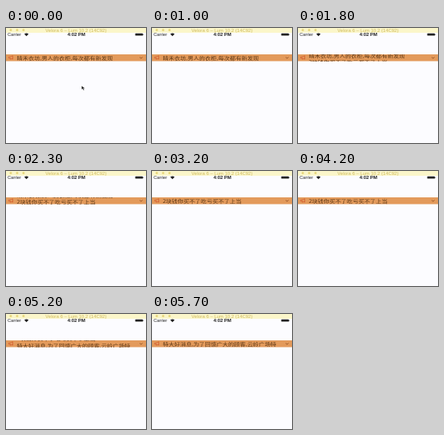
Animation of 176 by 144 pixels, one loop 5800 ms. Source, as an HTML page:

```html
<!DOCTYPE html>
<html lang="zh">
<head>
<meta charset="utf-8">
<title>Scrolling notice</title>
<style>
  html, body { margin: 0; width: 100%; height: 100%; overflow: hidden; background: #fcfcff; }
  svg { display: block; width: 176px; height: 144px; }
  text { font-family: "Liberation Sans", sans-serif; }
  #lines text { font: 7.3px "Noto Sans CJK SC", "Noto Sans CJK", sans-serif; fill: #5c3715; }
</style>
</head>
<body>
<svg viewBox="0 0 176 144">
  <defs><clipPath id="band"><rect y="33" width="176" height="9"/></clipPath></defs>
  <rect width="176" height="144" fill="#fcfcff"/>

  <!-- window title -->
  <rect width="176" height="6" fill="#fbf6ca"/>
  <g fill="#e6d67c">
    <circle cx="6" cy="2.5" r="1.5"/><circle cx="14" cy="2.5" r="1.5"/><circle cx="22" cy="2.5" r="1.5"/>
  </g>
  <text transform="translate(88 4.6) scale(1 .8)" font-size="6" text-anchor="middle" fill="#cdb95c">Velora 6 – Lum 10.2 (14C92)</text>

  <!-- status bar -->
  <g fill="#222">
    <text transform="translate(2 10) scale(1 .8)" font-size="5.6">Carrier</text>
    <text transform="translate(88.5 10) scale(1 .8)" font-size="6" font-weight="bold" text-anchor="middle">4:02 PM</text>
    <path d="M23 7.6Q25.7 5.6 28.4 7.6L25.7 10.2Z"/>
    <rect x="162.5" y="6.8" width="9.5" height="2.8" rx=".6"/>
    <rect x="172.4" y="7.6" width=".7" height="1.2"/>
  </g>

  <!-- notice -->
  <rect y="33" width="176" height="8.5" fill="#e39a5b"/>
  <path d="M3.5 36.2H5L8.5 34.8V39L5 37.8H3.5ZM5 38L5.8 39.6" fill="none" stroke="#d2552b" stroke-width=".7"/>
  <path d="M168 36.6L169.8 38L171.6 36.6" fill="none" stroke="#8a4a20" stroke-width=".8"/>
  <g clip-path="url(#band)"><g id="lines"></g></g>

  <path id="cursor" d="M95 72.5V77L96.3 76L97.4 78L98.4 77.5L97.4 75.6L99.4 75.4Z" fill="#222" stroke="#fff" stroke-width=".3"/>
</svg>
<script>
const LOOP = 5800, STEP = 100, ROW = 8.2, SCROLL = 1500;
const notices = [
  "晴禾衣坊,男人的衣柜,每次都有新发现",
  "2块钱你买不了吃亏买不了上当",
  "特大好消息,为了回馈广大的顾客,云岭广场特"
];
const lines = document.getElementById("lines");
const cursor = document.getElementById("cursor");

notices.forEach((notice, i) => {
  const line = document.createElementNS("http://www.w3.org/2000/svg", "text");
  line.textContent = notice.replaceAll(",", ",");
  line.setAttribute("transform", `translate(13.5 ${39.5 + i * ROW}) scale(1 .8)`);
  lines.append(line);
});

const ease = p => (1 - Math.cos(Math.PI * p)) / 2;
const scrolled = (t, start) => ease(Math.min(1, Math.max(0, (t - start) / SCROLL)));

function draw(now) {
  const t = Math.floor(now % LOOP / STEP) * STEP;
  const shift = scrolled(t, 1200) + scrolled(t, 4200);
  lines.setAttribute("transform", `translate(0 ${-shift * ROW})`);
  cursor.style.display = t < 1000 ? "" : "none";
  requestAnimationFrame(() => draw(performance.now()));
}
draw(performance.now());
</script>
</body>
</html>
```
